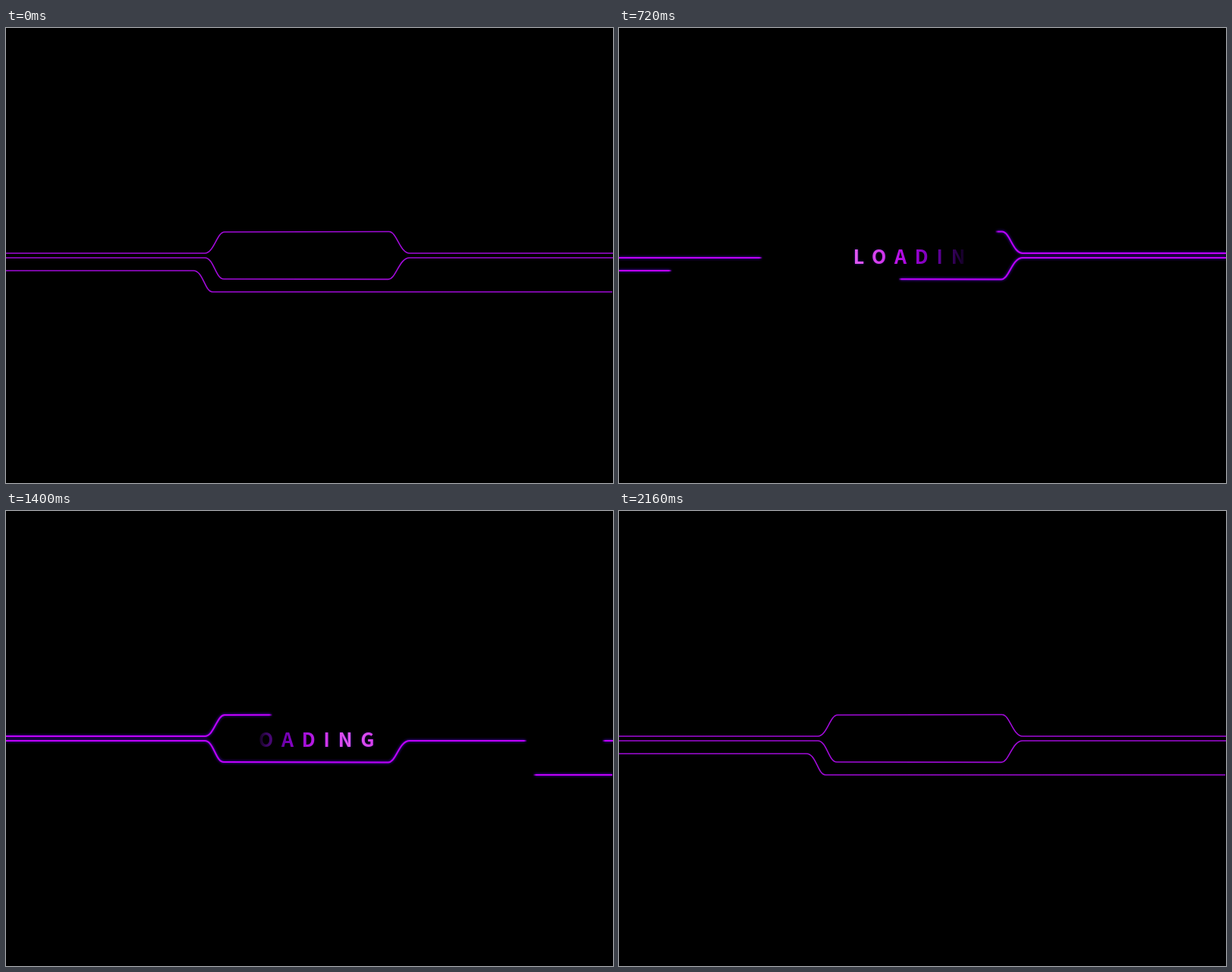
An HTML page for the animation above (2400 ms loop, 800x600 px).

```html
<!DOCTYPE html>
<html lang="en">
<head>
<meta charset="utf-8">
<title>Loading</title>
<style>
  html, body { margin: 0; width: 100%; height: 100%; overflow: hidden; background: #000; }
  svg { display: block; width: 800px; height: 600px; }
  path { fill: none; }
  text {
    font: bold 25px "Noto Sans CJK JP", "Noto Sans CJK SC", "Noto Sans CJK", "Open Sans", sans-serif;
    letter-spacing: 10.9px;
  }
</style>
</head>
<body>
<svg id="stage" viewBox="0 0 800 600">
  <defs>
    <filter id="glow" filterUnits="userSpaceOnUse" x="-20" y="240" width="840" height="140" color-interpolation-filters="sRGB">
      <feGaussianBlur in="SourceAlpha" stdDeviation="1.5" result="soft"/>
      <feFlood flood-color="#5608e0"/>
      <feComposite in2="soft" operator="in"/>
    </filter>
    <filter id="blur" filterUnits="userSpaceOnUse" x="290" y="270" width="220" height="60" color-interpolation-filters="sRGB">
      <feGaussianBlur stdDeviation="1.5"/>
    </filter>
  </defs>
  <g id="halo" filter="url(#glow)" stroke-width="4"></g>
  <g id="lines"></g>
  <text x="308.7" y="310.5" fill="url(#shine)" filter="url(#blur)">LOADING</text>
  <text x="308.7" y="310.5" fill="url(#wave)">LOADING</text>
</svg>
<script>
const LOOP = 2400, STEP = 40, END = 2160, WIDTH = 800, FADE = 4;
const $ = id => document.getElementById(id);

function add(parent, tag, attrs) {
  const el = document.createElementNS("http://www.w3.org/2000/svg", tag);
  for (const key in attrs) el.setAttribute(key, attrs[key]);
  return parent.appendChild(el);
}

const clamp = v => Math.min(1, Math.max(0, v));
const mix = (a, b, k) => a + (b - a) * k;

// cubic-bezier(1/3, 0, x2, 1) between two times
function ease(t, from, to, x2 = 2 / 3) {
  const u = clamp((t - from) / (to - from));
  if (u === 0 || u === 1) return u;
  let lo = 0, hi = 1;
  for (let i = 0; i < 24; i++) {
    const s = (lo + hi) / 2, r = 1 - s;
    if (s * r * r + 3 * x2 * s * s * r + s * s * s < u) lo = s; else hi = s;
  }
  return lo * lo * (3 - 2 * lo);
}

// gap(t) gives the hidden stretch of each line as fractions of the width
const tracks = [
  {
    d: "M0 297H262C274 297 278 269 288 269L505 268.5C515 268.5 519 297 532 297H800",
    gap: t => [ease(t, 760, 2000, 5 / 6), ease(t, 0, 1240)]
  },
  {
    d: "M0 303H262C274 303 276 331 287 331L504 331.4C514 331.4 518 303 532 303H800",
    gap: t => [ease(t, 240, 1760), ease(t, 0, 1520)]
  },
  {
    d: "M0 320H247C260 320 262 348 272 348H799",
    gap: t => [1 - ease(t, 0, 880), 1 - ease(t, 1200, 2080)]
  }
];

function addGradient(id, stops) {
  const gradient = add($("stage"), "linearGradient", { id, gradientUnits: "userSpaceOnUse", x1: 0, x2: WIDTH, y1: 0, y2: 0 });
  gradient.stopList = stops.map(attrs => add(gradient, "stop", attrs));
  return gradient;
}

tracks.forEach((track, i) => {
  track.stops = addGradient("cut" + i, [1, 0, 0, 1].map(o => ({ "stop-opacity": o }))).stopList;
  const look = { d: track.d, stroke: `url(#cut${i})` };
  add($("halo"), "path", look);
  add($("lines"), "path", look);
});

// Colours by distance from the crest of the light passing over the word
function addCrest(id, points) {
  const first = points[0][0], span = points[points.length - 1][0] - first;
  const gradient = addGradient(id, points.map(([x, color, opacity = 1]) =>
    ({ offset: (x - first) / span, "stop-color": color, "stop-opacity": opacity })));
  gradient.moveTo = x => {
    gradient.setAttribute("x1", x + first);
    gradient.setAttribute("x2", x + first + span);
  };
  return gradient;
}

const wave = addCrest("wave", [
  [-128, "#000"], [-113, "#3c0864"], [-85, "#7a00ba"], [-57, "#b014e0"], [-30, "#d63cec"],
  [0, "#e058f0"],
  [30, "#d63cec"], [57, "#b80ce6"], [85, "#8a00c8"], [111, "#580090"], [137, "#1c0034"], [146, "#000"]
]);
const shine = addCrest("shine", [[-75, "#4418d0", 0], [0, "#4418d0", 0.75], [75, "#4418d0", 0]]);

function draw(t) {
  const level = Math.sin(Math.PI * t / END);
  const bright = clamp(level * 1.8);
  const color = `rgb(${mix(160, 192, bright)},${mix(10, 0, bright)},${mix(216, 250, bright)})`;

  for (const { gap, stops } of tracks) {
    const [head, tail] = gap(t).map(p => p * WIDTH);
    const edges = [head - Math.min(FADE, WIDTH - head), head, tail, tail + Math.min(FADE, tail)];
    stops.forEach((stop, i) => {
      stop.setAttribute("offset", clamp(edges[i] / WIDTH));
      stop.setAttribute("stop-color", color);
    });
  }
  $("lines").setAttribute("stroke-width", mix(1.6, 2, bright));
  $("halo").setAttribute("opacity", 0.6 * level);

  const crest = 398 + 0.21 * (t - 1120);
  wave.moveTo(crest);
  shine.moveTo(crest);
}

const start = performance.now();
function tick() {
  const t = (performance.now() - start) % LOOP;
  draw(Math.min(END, Math.floor(t / STEP) * STEP));
  requestAnimationFrame(tick);
}
tick();
</script>
</body>
</html>
```
